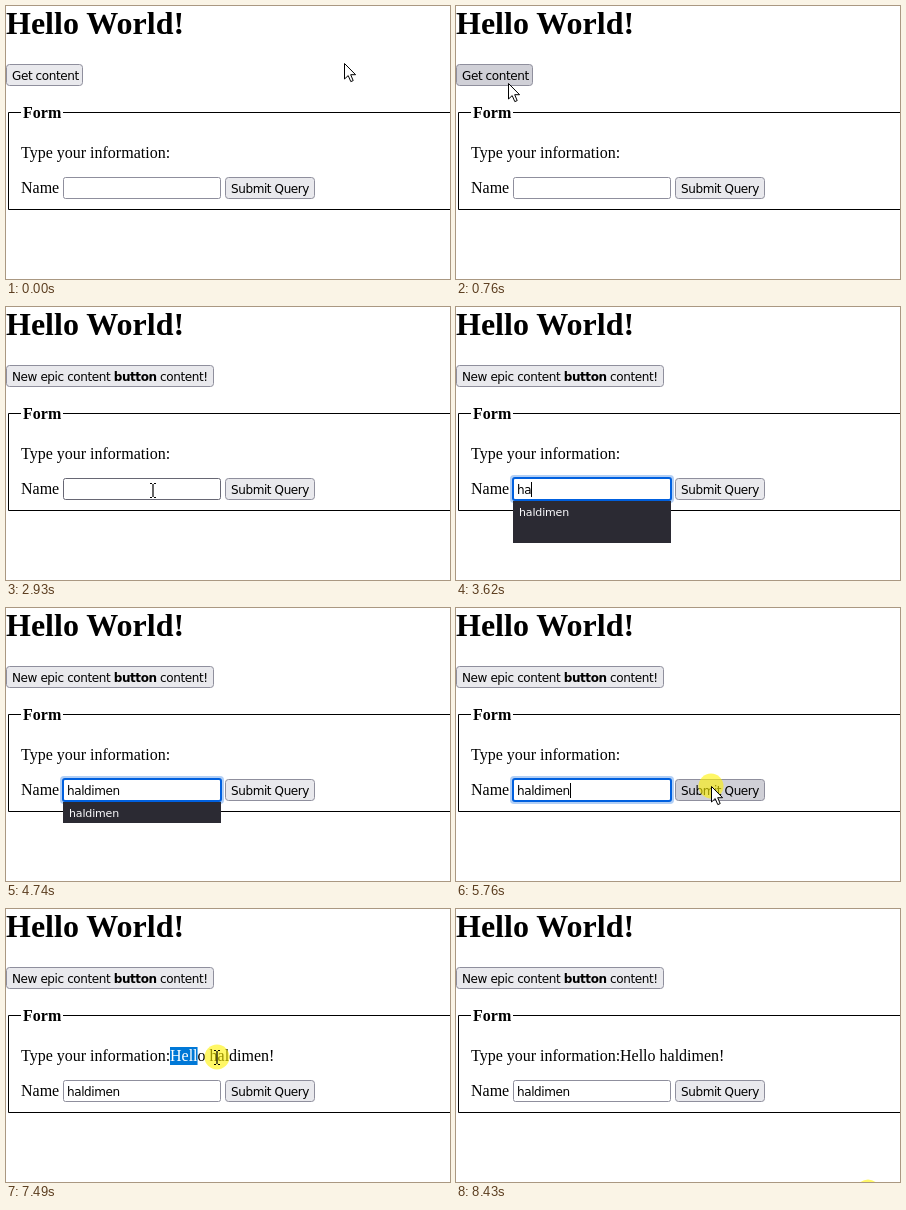
These frames come from a looping animation (444x273 px, 8.5 s). An HTML page:

```html
<!DOCTYPE html>
<html lang="en">
<head>
<meta charset="utf-8">
<title>Form demo</title>
<style>
  html, body { margin: 0; width: 100%; height: 100%; overflow: hidden; background: #fff; }
  svg { display: block; }
  text { font: 16px "Liberation Serif", "Times New Roman", serif; white-space: pre; }
  .h1 { font-size: 32px; font-weight: bold; }
  .b { font-weight: bold; }
  .ui { font: 12px "DejaVu Sans", sans-serif; letter-spacing: -.4px; }
  .item { font: 11px "DejaVu Sans", sans-serif; letter-spacing: -.15px; fill: #fbfbfe; }
  .btn { fill: #e9e9ed; stroke: #8f8f9d; }
  .btn.hover { fill: #d0d0d7; }
  .box { fill: #fff; stroke: #8f8f9d; }
  .box.hover { stroke: #676774; }
</style>
</head>
<body>
<svg width="444" height="273" viewBox="0 0 444 273">
  <text class="h1" x="0" y="28">Hello World!</text>

  <rect id="get" class="btn" x=".5" y="58.5" width="76" height="21" rx="3"/>
  <text id="before" class="ui" x="6" y="74">Get content</text>
  <text id="after" class="ui" x="6" y="74">New epic content <tspan class="b">button</tspan> content!</text>

  <path d="M15 106.5H2.5V203.5H446M57 106.5H446" fill="none" stroke="#000"/>
  <text class="b" x="17" y="112">Form</text>
  <text x="15" y="152">Type your information:</text>
  <rect id="mark" x="164" y="138" height="18" fill="#0078d7"/>
  <text id="out" x="164" y="152"><tspan id="picked" fill="#fff"></tspan><tspan id="rest"></tspan></text>

  <text x="15" y="187">Name</text>
  <rect id="field" class="box" x="57.5" y="171.5" width="157" height="21" rx="2"/>
  <g id="ring">
    <rect x="54" y="168" width="164" height="28" rx="4" fill="#0060df" fill-opacity=".3"/>
    <rect x="56" y="170" width="160" height="24" rx="3" fill="#0060df"/>
    <rect x="58" y="172" width="156" height="20" rx="1" fill="#fff"/>
  </g>
  <text id="value" class="ui" x="61" y="187"></text>
  <rect id="caret" y="175" width="1" height="15"/>
  <rect id="send" class="btn" x="219.5" y="171.5" width="89" height="21" rx="3"/>
  <text class="ui" x="225" y="187">Submit Query</text>

  <g id="list">
    <rect id="panel" x="57" y="194" width="158" height="21" fill="#2b2a33"/>
    <text id="hint" class="item" x="63" y="209"></text>
  </g>

  <g id="pointer">
    <circle id="press" r="12.5" fill="#fff200" fill-opacity=".6"/>
    <path id="arrow" d="M.5 .5V16L4.2 12.6 6.8 18.6 9.2 17.6 6.7 11.7H11.6Z" fill="#fff" stroke="#000"/>
    <path id="beam" d="M-3 -6.5H-1M1 -6.5H3M-3 7.5H-1M1 7.5H3M0 -6V7" fill="none" stroke="#000" stroke-width="1.2"/>
  </g>
</svg>
<script>
const LOOP = 8500, STEP = 70;
const NAME = 'haldimen', GREETING = `Hello ${NAME}!`;

// Pointer moves: start, end, control point, end point
const START = [338, 57];
const MOVES = [
  [0, 760, 200, 60, 52, 77],
  [1230, 1440, 60, 80, 77, 89],
  [2360, 2930, 110, 150, 147, 183],
  [2990, 3200, 160, 182, 168, 176],
  [4930, 5690, 215, 140, 255, 178],
  [5830, 6320, 290, 190, 322, 217],
  [6510, 7270, 170, 190, 164, 148],
  [7290, 7700, 213, 148, 262, 148],
  [7910, 8300, 340, 190, 412, 283]
];
const PRESSES = [[1160, 1230], [3200, 3480], [5690, 5900], [7270, 7700], [7840, 7910], [8430, 8500]];
const KEYS = [3480, 3570, 3660, 3750, 3950, 4150, 4350, 4480];

const ui = {};
document.querySelectorAll('[id]').forEach(el => ui[el.id] = el);
const show = (el, on) => el.setAttribute('visibility', on ? 'visible' : 'hidden');
const hover = (el, on) => el.classList.toggle('hover', on);
const within = (t, a, b) => t >= a && t < b;
const inBox = ([x, y], x0, y0, x1, y1) => within(x, x0, x1) && within(y, y0, y1);
const smooth = k => k * k * (3 - 2 * k);

function pointerAt(t) {
  let pos = START;
  for (const [t0, t1, cx, cy, x, y] of MOVES) {
    if (t < t0) break;
    if (t < t1) {
      const tick = Math.max(t0, t1 - Math.ceil((t1 - t) / STEP) * STEP);
      const k = smooth((tick - t0) / (t1 - t0)), j = 1 - k;
      const curve = (a, b, c) => j * j * a + 2 * j * k * b + k * k * c;
      return [curve(pos[0], cx, x), curve(pos[1], cy, y)];
    }
    pos = [x, y];
  }
  return pos;
}

function drawPage(t, pos) {
  const renamed = t >= 1230, sent = t >= 5900;
  show(ui.before, !renamed);
  show(ui.after, renamed);
  ui.get.setAttribute('width', renamed ? 207 : 76);
  hover(ui.get, inBox(pos, 0, 58, renamed ? 208 : 77, 80));
  hover(ui.send, inBox(pos, 219, 171, 309, 193));

  let picked = 0;
  if (within(t, 7290, 7700)) picked = Math.round(Math.max(0, pos[0] - 184) / 6.85);
  else if (within(t, 7700, 7840)) picked = GREETING.length;
  ui.picked.textContent = sent ? GREETING.slice(0, picked) : '';
  ui.rest.textContent = sent ? GREETING.slice(picked) : '';
  ui.mark.setAttribute('width', picked ? ui.out.getSubStringLength(0, picked) : 0);
}

function drawField(t, pos) {
  const typed = KEYS.filter(k => t >= k).length;
  const focused = within(t, 3270, 5830);
  const last = KEYS[KEYS.length - 1];
  ui.value.textContent = NAME.slice(0, typed);
  hover(ui.field, inBox(pos, 57, 171, 215, 193) && !within(t, 3480, 5000));
  show(ui.ring, focused);
  show(ui.caret, focused && (t < last || Math.floor((t - last) / 260) % 2 === 0));
  ui.caret.setAttribute('x', 61 + (typed ? Math.round(ui.value.getComputedTextLength()) : 0));
  show(ui.list, within(t, 3480, 5690));
  ui.panel.setAttribute('height', t < 3950 ? 42 : 21);
}

function drawPointer(t, pos) {
  const visible = !within(t, 3480, 5000);
  const overText = inBox(pos, 57, 171, 215, 193) || inBox(pos, 15, 138, t < 5900 ? 164 : 269, 157);
  ui.pointer.setAttribute('transform', `translate(${pos.map(Math.round)})`);
  show(ui.arrow, visible && !overText);
  show(ui.beam, visible && overText);
  show(ui.press, PRESSES.some(([a, b]) => within(t, a, b)));
}

function draw(t) {
  const pos = pointerAt(t);
  drawPage(t, pos);
  drawField(t, pos);
  drawPointer(t, pos);
}

ui.hint.textContent = NAME;
const begin = performance.now();
function tick() {
  draw((performance.now() - begin) % LOOP);
  requestAnimationFrame(tick);
}
tick();
</script>
</body>
</html>
```
